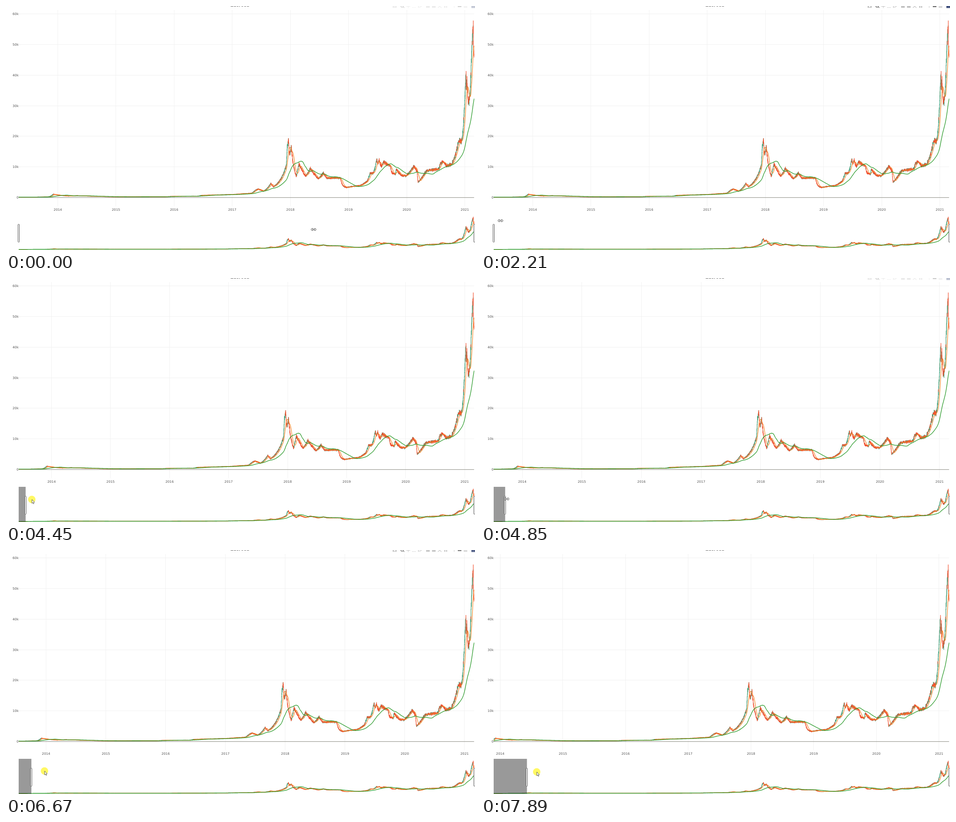
An HTML page with a canvas for the animation above (8000 ms loop, 1036x541 px).

```html
<!DOCTYPE html>
<html lang="en">
<head>
<meta charset="utf-8">
<title>Price chart with range slider</title>
<style>
html, body { margin: 0; width: 100%; height: 100%; overflow: hidden; background: #fff; }
canvas { display: block; }
</style>
</head>
<body>
<canvas id="stage" width="1036" height="541"></canvas>
<script>
const ctx = document.getElementById('stage').getContext('2d');
const LOOP = 8000, LEFT = 28, RIGHT = 1034, SPAN = RIGHT - LEFT, DAYS = 2861;
const FONT = '"DejaVu Sans", Verdana, sans-serif';

// Price anchors: x on the full-range axis, price in thousands
const anchors = [
  [28, .13], [92, .18], [104, 1.1], [116, .8], [138, .45], [156, .62], [248, .22], [350, .26],
  [372, .43], [425, .45], [431, .72], [500, 1], [521, 1.2], [542, 1.4], [551, 2.4], [557, 2.8],
  [569, 2.05], [585, 4.6], [591, 3.5], [606, 5.8], [619, 10.5], [621, 16.5], [624, 19],
  [626, 13.8], [630, 16.8], [634, 11.2], [641, 7], [647, 11], [662, 6.9], [672, 9.6], [690, 6.1],
  [701, 8.1], [708, 6.4], [738, 6.4], [744, 3.9], [751, 3.3], [784, 4], [798, 5.4], [804, 7.9],
  [812, 8.1], [819, 12.6], [821, 10.8], [824, 12.2], [829, 10], [834, 11.7], [849, 10.2],
  [852, 8.2], [860, 7.6], [862, 9.3], [873, 7.2], [884, 7.1], [901, 10.2], [908, 8.6], [910, 5],
  [928, 8.8], [956, 9.3], [959, 11.1], [965, 11.8], [973, 10.4], [985, 11], [992, 13.7],
  [1000, 18.6], [1007, 18.6], [1010, 23.3], [1016, 40.5], [1017, 34.5], [1018, 38.5],
  [1021, 31], [1025, 33.5], [1028, 46], [1031.7, 56.5], [1032.6, 49], [1034, 45.5]
];

let seed = 7;
const random = () => (seed = seed * 16807 % 2147483647) / 2147483647;

function trend(x) {
  const i = Math.max(1, anchors.findIndex(a => a[0] >= x));
  const [x0, a] = anchors[i - 1], [x1, b] = anchors[i];
  return a * (b / a) ** ((x - x0) / (x1 - x0));
}

const close = [], candles = [];
for (let i = 0; i <= DAYS; i++) {
  close[i] = trend(LEFT + i / DAYS * SPAN) * (1 + (random() - .5) * .05);
  const open = close[Math.max(0, i - 1)];
  candles[i] = {
    up: close[i] >= open,
    high: Math.max(open, close[i]) * (1 + .04 * random() ** 3),
    low: Math.min(open, close[i]) * (1 - .05 * random() ** 3)
  };
}

function average(size) {
  let sum = 0;
  return close.map((v, i) => {
    sum += v - (i >= size ? close[i - size] : 0);
    return sum / Math.min(i + 1, size);
  });
}
const fast = average(20), slow = average(100);

function stroke(color, width, build) {
  ctx.strokeStyle = color;
  ctx.lineWidth = width;
  ctx.beginPath();
  build();
  ctx.stroke();
}
const line = (...p) => p.forEach(([x, y], i) => i ? ctx.lineTo(x, y) : ctx.moveTo(x, y));

function polygon(points, fill, edge, width = .8) {
  ctx.beginPath();
  line(...points);
  ctx.closePath();
  ctx.fillStyle = fill;
  ctx.fill();
  ctx.strokeStyle = edge;
  ctx.lineWidth = width;
  ctx.stroke();
}

function rect(color, x, y, w, h) {
  ctx.fillStyle = color;
  ctx.fillRect(x, y, w, h);
}

function drawSeries(toX, toY, top, height) {
  ctx.save();
  ctx.beginPath();
  ctx.rect(LEFT, top, SPAN + .6, height);
  ctx.clip();
  ctx.lineJoin = 'round';
  ctx.lineCap = 'square';
  for (const up of [true, false])
    stroke(up ? '#3d9970' : '#f4502f', 1.2, () => candles.forEach((c, i) => {
      if (c.up === up) line([toX(i), toY(c.high)], [toX(i), toY(c.low)]);
    }));
  const curve = data => () => line(...data.map((v, i) => [toX(i), toY(v)]));
  stroke('#f5831f', 1.2, curve(fast));
  stroke('#2a9a2a', 1.3, curve(slow));
  ctx.restore();
}

function label(text, x, y, align, size = 7.2) {
  ctx.font = size + 'px ' + FONT;
  ctx.textAlign = align;
  ctx.fillStyle = '#555';
  ctx.fillText(text, x, y);
}

function drawChart(start) {
  const toX = day => LEFT + (day - start) / (DAYS - start) * SPAN;
  const toY = price => 424.6 - price * 6.783;
  for (let k = 0; k <= 60; k += 10) {
    const y = Math.floor(toY(k)) + .5;
    if (k) stroke('#f1f1f1', 1, () => line([LEFT, y], [RIGHT, y]));
    label(k ? k + 'k' : '0', 27.8, y + 2.6, 'right');
  }
  for (let year = 2014; year <= 2021; year++) {
    const x = toX(246 + (year - 2014) * 365.25);
    stroke('#f1f1f1', 1, () => line([Math.floor(x) + .5, 9], [Math.floor(x) + .5, 444]));
    label(year, x, 454, 'center');
  }
  stroke('#85857d', 1, () => line([LEFT, 424.7], [RIGHT, 424.7]));
  drawSeries(toX, toY, 8, 436);
  label('ZLO/USD', 517.5, 1.2, 'center', 9.6);
}

function drawHandle(x) {
  ctx.fillStyle = '#fff';
  ctx.strokeStyle = '#555';
  ctx.lineWidth = 1;
  ctx.beginPath();
  ctx.roundRect(x - 1.5, 484, 3, 39.5, .8);
  ctx.fill();
  ctx.stroke();
}

function drawSlider(handle) {
  drawSeries(i => LEFT + i / DAYS * SPAN, p => 539.7 - p * 1.243, 463, 78);
  if (handle > LEFT) rect('rgba(0,0,0,.4)', LEFT, 463, handle - LEFT + .4, 77.5);
  drawHandle(handle);
  drawHandle(1034.8);
}

function drawToolbar(alpha) {
  const pale = '#c4c4c4', dark = '#777';
  ctx.save();
  ctx.globalAlpha = alpha;
  rect(pale, 854, 0, 9, 4);
  rect('#fff', 857, 0, 3, 2.5);
  stroke(dark, 1.5, () => { ctx.arc(875, 0, 2.8, 0, 7); line([877, 1.5], [880, 4]); });
  stroke(pale, 1.2, () => {
    line([884, .5], [893, .5]);
    line([888.5, 0], [888.5, 4.5]);
    line([911, 0], [911, 4]);
    line([911, 2.5], [915, 2.5], [918, 0]);
    line([954, 4], [958, .5], [962, 4]);
  });
  for (let x = 897; x < 906; x += 3) rect(pale, x, 3, 2, 1);
  for (const x of [928, 941]) rect(pale, x, 0, 8, 4);
  rect(pale, 968, 0, 2.5, 4);
  rect(pale, 972, 0, 2.5, 4);
  rect(pale, 989.5, 0, 1, 4);
  rect(dark, 998, 0, 8, 2.5);
  rect(pale, 1011, 0, 8, 1.2);
  rect(pale, 1011, 2.2, 8, 1.6);
  rect('#3f4f7c', 1028, 0, 8, 4.5);
  ctx.restore();
}

// Pointer moves: start, end, steps, x, y
const moves = [
  [380, 520, 3, 376.5, 388], [720, 860, 3, 193.5, 298.5], [1060, 1750, 10, 44.5, 474],
  [2210, 2210, 1, 43, 476], [2280, 2840, 9, 31.5, 492], [3120, 3260, 3, 29.5, 491],
  [3620, 3820, 3, 36.5, 491], [3890, 4240, 6, 57, 491], [4710, 5120, 7, 56, 488.5],
  [6110, 6670, 8, 85, 490], [6740, 6890, 4, 95, 491], [6950, 7220, 5, 117, 492],
  [7690, 7890, 4, 123, 492]
];

function pointerAt(t) {
  let x = 679.5, y = 495.5;
  for (const [from, to, steps, nx, ny] of moves) {
    if (t < from) break;
    const gap = (to - from) / (steps - 1) || 1;
    const part = Math.min(steps, Math.floor((t - from) / gap + .01) + 1) / steps;
    x += (nx - x) * part;
    y += (ny - y) * part;
  }
  return [x, y];
}

// The chart follows the drag late, in jumps
const jumps = [[0, 28], [4450, 43], [4710, 53], [4920, 55.2], [6110, 55.7], [6890, 64],
  [7090, 74], [7220, 86], [7690, 94], [7890, 101.1]];
const handleAt = t => jumps.filter(j => j[0] <= t).pop()[1];

function toolbarAt(t) {
  const ramp = (from, to) => Math.min(1, Math.max(0, (t - from) / (to - from)));
  return t < 70 ? .3 : 1 - ramp(3890, 4240) + ramp(4710, 5120) - ramp(6640, 6890);
}

function drawPointer(t) {
  const [x, y] = pointerAt(t);
  const pressed = t >= 3620 && t < 4850 || t >= 5780;
  const arrow = t >= 3690 && t < 4850 || t >= 6110;
  if (pressed) {
    ctx.fillStyle = 'rgba(255,245,40,.72)';
    ctx.beginPath();
    ctx.arc(x, y, 8.2, 0, 7);
    ctx.fill();
  }
  ctx.save();
  ctx.translate(x, y);
  ctx.lineJoin = 'miter';
  if (arrow) {
    polygon([[.3, 0], [.3, 8.6], [2.2, 6.9], [3.5, 9.8], [4.9, 9.2], [3.6, 6.4], [6, 6.2]],
      '#fffef0', '#444');
  } else {
    const half = [[-6, 0], [-2.8, -3], [-2.8, -1], [2.8, -1], [2.8, -3], [6, 0]];
    polygon([...half, [2.8, 3], [2.8, 1], [-2.8, 1], [-2.8, 3]], '#fff', '#333');
  }
  ctx.restore();
}

function frame(now) {
  const t = now % LOOP, handle = handleAt(t);
  rect('#fff', 0, 0, 1036, 541);
  drawChart((handle - LEFT) / SPAN * DAYS);
  drawSlider(handle);
  drawToolbar(toolbarAt(t));
  drawPointer(t);
  requestAnimationFrame(frame);
}
requestAnimationFrame(frame);
</script>
</body>
</html>
```
